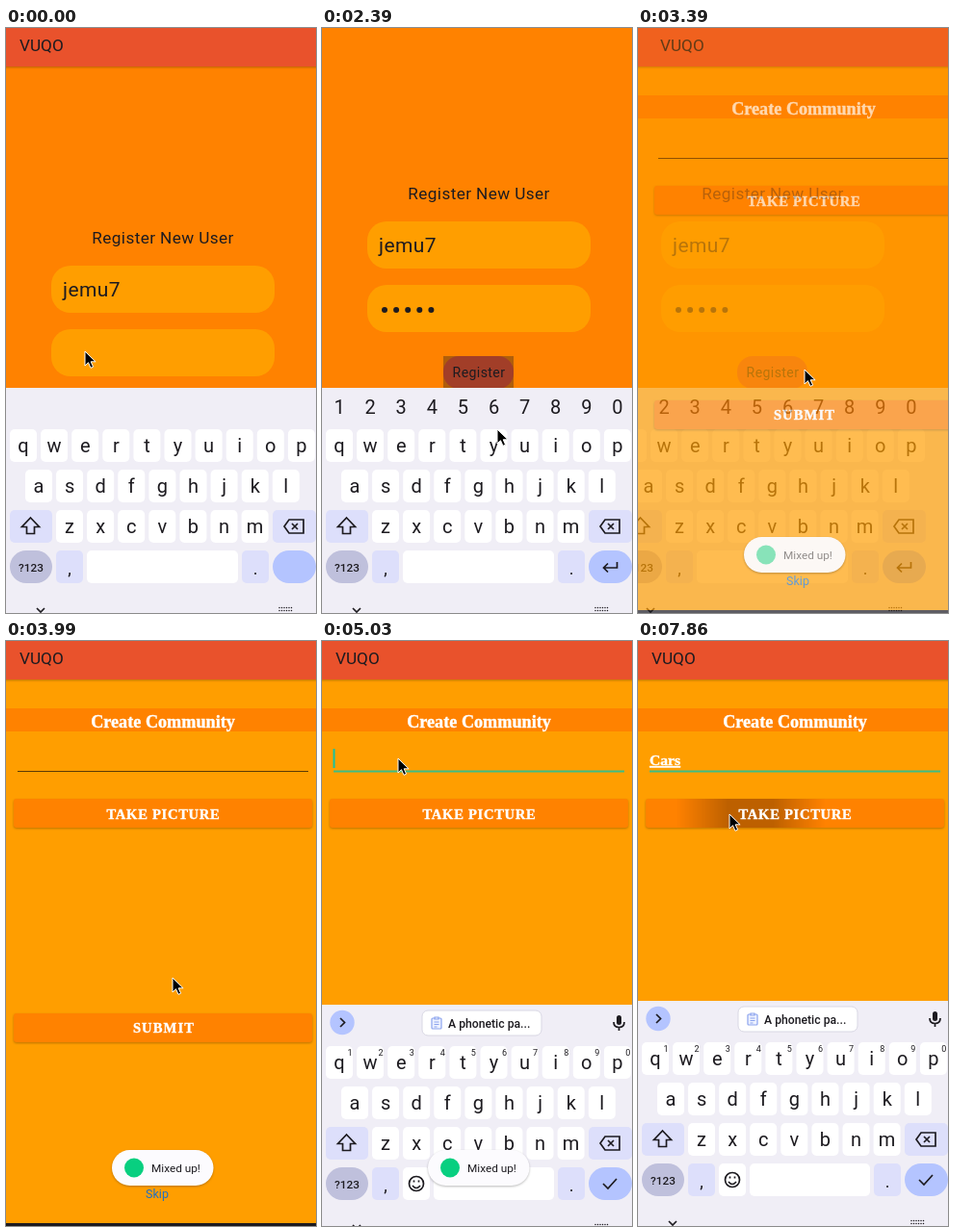
An HTML page for the animation above (8 s loop, 322 by 608 pixels).

```html
<!DOCTYPE html>
<html lang="en">
<head>
<meta charset="utf-8">
<title>Register and create a community</title>
<style>
  html, body { margin: 0; width: 100%; height: 100%; overflow: hidden; background: #ff8200; }
  svg { display: block; width: 322px; height: 608px; font-family: Roboto, sans-serif; fill: #1d1b20; }
  .mid { text-anchor: middle; }
  .bar { fill: #e9522c; }
  .deep { fill: #ff8200; }
  .amber { fill: #ff9e00; }
  .board { fill: #f0eef6; }
  .white { fill: #fff; }
  .soft { fill: #dddffb; }
  .blue { fill: #b4c4ff; }
  .line { fill: none; stroke: #1d1b20; stroke-width: 1.7; }
  .dots { fill: none; stroke: #1d1b20; stroke-linecap: round; }
  .chip { fill: #fff; stroke: #d9d8e4; }
  .clip { fill: #eef2ff; stroke: #8ba3ee; stroke-width: 1.2; }
  .caret { stroke: #17c3a0; stroke-width: 2; }
  .body { letter-spacing: .39px; }
  .slab { font: bold 16.5px "Liberation Serif", serif; fill: #fff; stroke: #fff; stroke-width: .4; }
  .slab.hint { fill: #6e4606; stroke: #6e4606; }
  .slab.label { font-size: 14.6px; letter-spacing: .7px; }
  .slab.typed { font-size: 15.6px; text-decoration: underline; }
  .raised { filter: drop-shadow(0 1px 1px #0004); }
  #ripple { transform-box: fill-box; transform-origin: 50% 50%; }
</style>
</head>
<body>
<svg viewBox="0 0 322 608">
  <defs>
    <linearGradient id="glow">
      <stop offset="0" stop-opacity="0"/>
      <stop offset=".35" stop-opacity=".26"/>
      <stop offset=".65" stop-opacity=".26"/>
      <stop offset="1" stop-opacity="0"/>
    </linearGradient>
    <g id="clipboard" class="clip">
      <rect x="-5" y="-5" width="10" height="11" rx="1"/>
      <path d="M-2-6h4v2h-4zM-2.5-1h5M-2.5 1.5h5M-2.5 4h3"/>
    </g>
    <g id="header">
      <rect class="bar raised" x="-60" y="-60" width="440" height="100"/>
      <text x="14" y="23.5" font-size="17.2">VUQO</text>
    </g>
    <g id="keys"></g>
  </defs>
  <rect class="deep" width="322" height="608"/>

  <g id="signup">
    <g id="form">
      <use href="#header"/>
      <g class="body">
        <text class="mid" x="163" y="224" font-size="17.2">Register New User</text>
        <rect class="amber" x="47" y="247" width="232" height="49" rx="20"/>
        <rect class="amber" x="47" y="313" width="232" height="49" rx="20"/>
        <text x="59" y="279" font-size="21">jemu7</text>
        <g id="password" font-size="21"></g>
        <rect class="bar" x="126" y="387" width="73" height="34" rx="16"/>
        <rect id="focus" x="126" y="387" width="73" height="34" fill-opacity=".35"/>
        <text class="mid" x="163" y="409" font-size="14.1">Register</text>
      </g>
      <path id="caret1" class="caret" d="M0 323v30"/>
    </g>
    <g id="board1">
      <rect class="board" x="-60" y="374" width="440" height="240"/>
      <use href="#keys"/>
      <rect class="white" x="84" y="543" width="157" height="34" rx="5"/>
      <g id="paste">
        <rect class="chip" x="94" y="380" width="144" height="26" rx="6"/>
        <use href="#clipboard" x="108" y="393"/>
        <path class="dots" d="M122.5 393.5h103.5" stroke-width="3" stroke-dasharray="0 5.15"/>
      </g>
      <g id="digits" class="mid" font-size="20"></g>
      <path id="done" class="line" d="M292 560l5 5 9-10"/>
      <path id="enter" class="line" d="M306.500 555v6h-14m4.500-4.500l-4.500 4.500 4.500 4.500"/>
      <rect id="press" x="277" y="543" width="45" height="34" rx="17" fill-opacity=".14"/>
    </g>
  </g>

  <g id="community">
    <rect class="amber" x="-60" width="440" height="608"/>
    <rect x="-60" y="605" width="440" height="3"/>
    <use href="#header"/>
    <rect class="deep" x="-60" y="70" width="440" height="24"/>
    <text class="slab mid" x="163" y="90" style="font-size:18.2px">Create Community</text>
    <text id="hint" class="slab hint" x="12" y="129">Community Name</text>
    <path d="M12 135.500h302" stroke="#5c3a04"/>
    <path id="active" d="M12 135.500h302" stroke="#3dbd85" stroke-width="1.800"/>
    <g id="typing"></g>
    <path id="caret2" class="caret" d="M0 112v20"/>
    <rect class="deep raised" x="8" y="164" width="310" height="30" rx="3"/>
    <rect id="ripple" x="40" y="164" width="154" height="30" fill="url(#glow)"/>
    <text class="slab label mid" x="163.500" y="185">TAKE PICTURE</text>
    <rect class="deep raised" x="8" y="387" width="310" height="30" rx="3"/>
    <text class="slab label mid" x="164" y="407" style="letter-spacing:1.1px">SUBMIT</text>
    <text class="mid" x="157" y="579" font-size="12.500" style="fill:#1f70c4">Skip</text>
  </g>

  <g id="board2">
    <rect class="board" y="374" width="322" height="240"/>
    <use href="#keys"/>
    <g id="corner" class="mid" font-size="9"></g>
    <rect class="white" x="84" y="543" width="28" height="34" rx="5"/>
    <rect class="white" x="116" y="543" width="125" height="34" rx="5"/>
    <circle class="line" cx="98" cy="560" r="7.500"/>
    <path class="line" d="M94 562q4 5 8 0M95.500 556.500v2M100.500 556.500v2"/>
    <path class="line" d="M292 560l5 5 9-10"/>
    <circle class="blue" cx="21" cy="392.500" r="12.700"/>
    <path class="line" d="M19 388l4.500 4.500-4.500 4.500"/>
    <rect class="chip" x="104" y="380" width="124" height="26" rx="6"/>
    <use href="#clipboard" x="119" y="393"/>
    <text x="131" y="397.500" font-size="12.200" font-weight="500">A phonetic pa...</text>
    <rect x="306" y="385" width="5" height="10" rx="2.500"/>
    <path class="line" d="M303 392q0 5.500 5.500 5.500t5.500-5.500M308.500 397v4"/>
  </g>

  <g id="toast">
    <rect class="raised" x="110" y="529" width="105.500" height="37" rx="18.500" style="fill:#fcfbfe"/>
    <g id="message">
      <circle cx="133" cy="547.500" r="10" style="fill:#08cf80"/>
      <text x="151" y="552" font-size="11.800">Mixed up!</text>
    </g>
  </g>
  <path id="mouse" d="M0 0v15l3.500-3.300 2.500 5.600 2.600-1.100-2.400-5.400h4.900z" style="fill:#000;stroke:#fff;stroke-width:1"/>
</svg>

<script>
const LOOP = 8000;
const $ = id => document.getElementById(id);
const add = (id, markup) => $(id).insertAdjacentHTML('beforeend', markup);

// Keyboard
const pitch = 32.1;
const key = (x, y, width, kind = 'white', rx = 5) =>
  `<rect class="${kind}" x="${x}" y="${y}" width="${width}" height="34" rx="${rx}"/>`;
const label = (x, y, text, size = 20, extra = '') =>
  `<text class="mid" x="${x}" y="${y}" font-size="${size}" ${extra}>${text}</text>`;

[['qwertyuiop', 18, 417], ['asdfghjkl', 34, 459], ['zxcvbnm', 66, 501]].forEach(([row, x, y]) =>
  [...row].forEach((letter, i) => {
    const cx = x + i * pitch;
    add('keys', key(cx - 14, y, 28) + label(cx, y + 23.5, letter));
  }));
add('keys', key(4, 501, 44, 'soft') + key(277, 501, 45, 'soft') +
  key(52, 543, 28, 'soft') + key(245, 543, 28, 'soft') + key(277, 543, 45, 'blue', 17) +
  `<rect x="4" y="543" width="44" height="34" rx="17" style="fill:#bfc0dc"/>` +
  label(26, 564.5, '?123', 11.8, 'font-weight="500"') + label(66, 568, ',', 18) + label(259, 568, '.', 18) +
  `<path class="line" d="M25.500 509l9 9.500h-5v7h-8v-7h-5zM294 511h15v14h-15l-5-7zM297 515l6 6m0-6l-6 6M32 603l4 4 4-4"/>
   <path class="dots" d="M284 602.500h13M284 605.500h13" stroke-width="1.500" stroke-dasharray="0 2.500"/>`);
[...'1234567890'].forEach((digit, i) => {
  const x = 18 + i * pitch;
  add('digits', `<text x="${x}" y="401">${digit}</text>`);
  add('corner', `<text x="${x + 11}" y="427">${digit}</text>`);
});

// Stepped tracks: [ms, value] pairs on one shared loop
function track(el, property, steps) {
  el.animate(steps.map(([ms, value]) => ({ offset: ms / LOOP, [property]: value, easing: 'step-end' })),
    { duration: LOOP, iterations: Infinity });
}
const fade = (id, ...steps) => track($(id), 'opacity', steps);
const move = (id, ...steps) =>
  track($(id), 'transform', steps.map(([ms, x, y]) => [ms, `translate(${x}px, ${y}px)`]));
const show = (el, from, to = LOOP) => track(el, 'opacity', [[0, 0], [from, 1], [to, 0]]);

// Password: the newest letter stays readable until the next one
const letters = [[0, 'm', 300], [300, 'r', 450, 2], [450, 'o', 750, 3], [750, '7', 1200, 4]];
letters.forEach(([from, letter, to, place = 0]) => {
  add('password', `<text x="${59 + place * 12.1}" y="346">${letter}</text>`);
  show($('password').lastChild, from, to);
});
[300, 300, 450, 750, 1200].forEach((from, i) => {
  add('password', `<circle cx="${65 + i * 12.1}" cy="339" r="3"/>`);
  show($('password').lastChild, from);
});
move('caret1', [0, 78, 0], [300, 93, 0], [450, 108, 0], [750, 121, 0]);
show($('caret1'), 0, 1350);

// Confirm, scroll, focus the button
show($('press'), 1800, 1950);
show($('done'), 0, 1950);
show($('paste'), 0, 1950);
show($('enter'), 1950);
show($('digits'), 1950);
show($('focus'), 1950, 2980);
move('form', [0, 0, 0], [1950, 0, -30], [2100, 0, -46]);

// Page change
move('signup', [0, 0, 0], [3260, -10, 0], [3390, -23, 0], [3540, -30, 0], [3690, -32, 0]);
move('community', [0, 32, 0], [3260, 22, 0], [3390, 9, 0], [3540, 2, 0], [3690, 0, 0]);
fade('community', [0, 0], [3260, .25], [3390, .69], [3540, 1]);
fade('toast', [0, 0], [3260, .4], [3390, .95], [3540, 1], [5480, .5], [5630, 0]);
fade('message', [0, .5], [3540, 1]);

// Community name
move('board2', [0, 0, 240], [4890, 0, 110], [5030, 0, 4], [5180, 0, 0]);
show($('active'), 4890);
show($('hint'), 0, 6380);
const typed = [6380, 6530, 6680, 6820, LOOP];
typed.slice(0, 4).forEach((from, i) => {
  add('typing', `<text class="slab typed" x="12" y="129">${'Cars'.slice(0, i + 1)}</text>`);
  show($('typing').lastChild, from, typed[i + 1]);
});
move('caret2', [0, 12.5, 0], [6380, 22, 0], [6530, 31, 0], [6680, 38, 0], [6820, 45, 0]);
fade('caret2', [0, 0], [4890, 1], [5330, 0], [5930, 1], [7270, 0], [7420, 1], [7570, 0]);
show($('ripple'), 7720);
track($('ripple'), 'transform', [[0, 'scaleX(.6)'], [7860, 'scaleX(1)']]);

move('mouse',
  [0, 82, 336], [900, 96, 352], [1050, 138, 398], [1200, 196, 458], [1350, 248, 512], [1500, 278, 542], [1650, 287, 551],
  [1950, 272, 532], [2100, 235, 485], [2240, 202, 444], [2390, 182, 417], [2540, 176, 385], [2690, 173, 362], [2840, 173, 355],
  [3990, 173, 350], [4140, 160, 310], [4290, 130, 236], [4440, 96, 160], [4590, 79, 122],
  [5780, 86, 129], [5930, 92, 135],
  [6970, 93, 142], [7120, 95, 155], [7270, 96, 168], [7420, 95, 174], [7570, 95, 176], [7720, 95, 180]);
</script>
</body>
</html>
```
